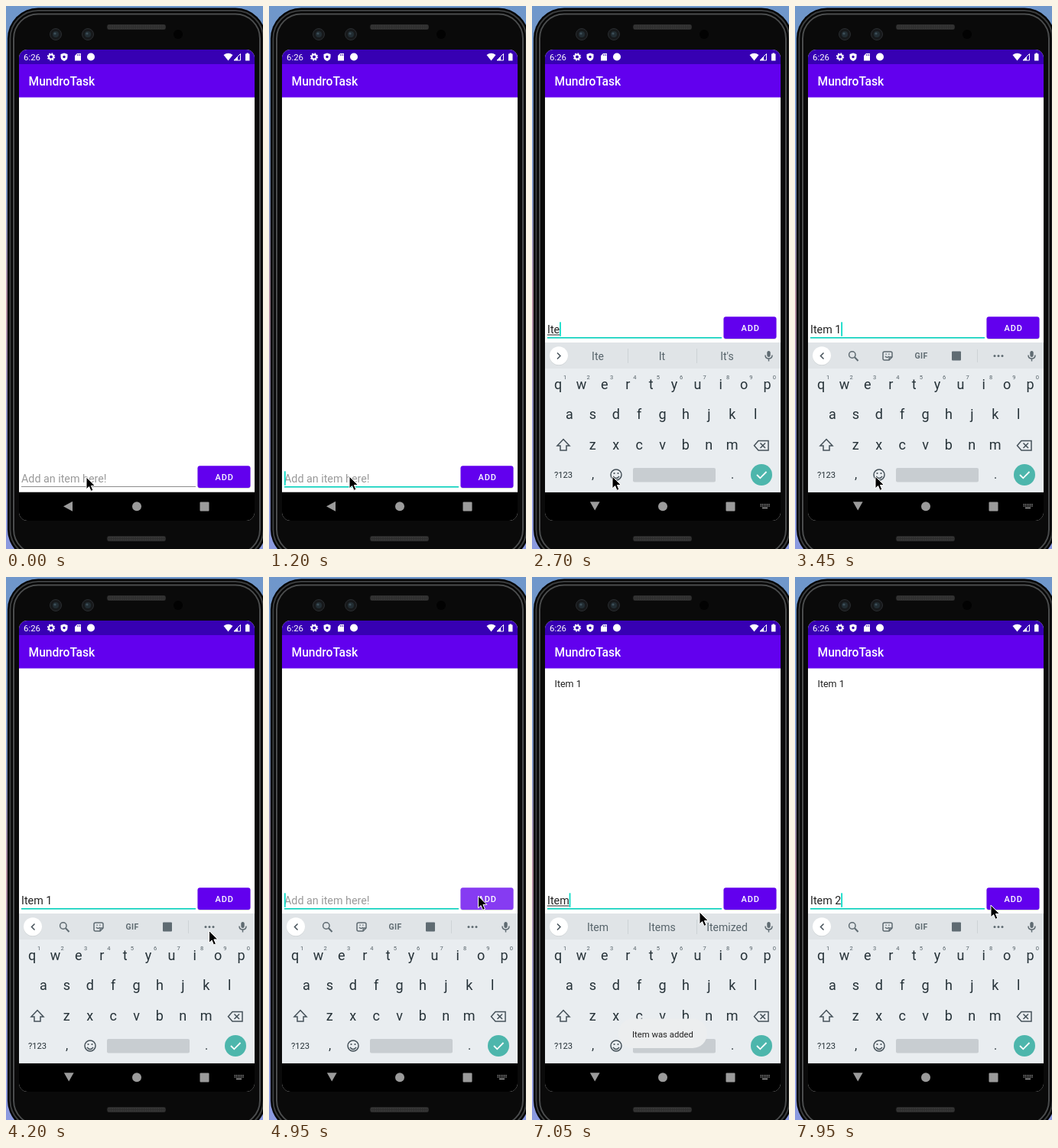
An HTML page for the animation above (8 s loop, 336 by 710 pixels).

```html
<!DOCTYPE html>
<html lang="en">
<head>
<meta charset="utf-8">
<title>Todo list demo</title>
<style>
html, body { margin: 0; width: 100%; height: 100%; overflow: hidden; background: #000; }
svg { display: block; width: 336px; height: 710px; font-family: Roboto, "Noto Sans", sans-serif; }
text { white-space: pre; }
.mid { text-anchor: middle; }
.med { font-weight: 500; }
.bold { font-weight: 700; }
.line { fill: none; stroke: #5f6b72; stroke-width: 1.5; }
.dark { fill: none; stroke: #455159; stroke-width: 1.5; }
</style>
</head>
<body>
<svg id="stage" viewBox="0 0 336 710"></svg>
<script>
const LOOP = 8000, TICK = 150;
const label = (x, y, size, fill, str, cls = '', more = '') =>
  `<text x="${x}" y="${y}" font-size="${size}" fill="${fill}" class="${cls}" ${more}>${str}</text>`;
const box = (x, y, w, h, fill, r = 0, more = '') =>
  `<rect x="${x}" y="${y}" width="${w}" height="${h}" rx="${r}" fill="${fill}" ${more}/>`;
const disc = (x, y, r, fill, more = '') => `<circle cx="${x}" cy="${y}" r="${r}" fill="${fill}" ${more}/>`;
const path = (d, more) => `<path d="${d}" ${more}/>`;
const LINE = 'class="line"', DARK = 'class="dark"';

function phone() {
  // Concentric rounded outlines; the right side runs past the stage edge.
  const shell = (inset, fill, stroke = 'none', w = 0) =>
    box(2 + inset, 2.5 + inset, 338 - 2 * inset, 722 - 2 * inset, fill, 40 - inset, `stroke="${stroke}" stroke-width="${w}"`);
  const camera = x => disc(x, 37, 7.5, '#17191b', 'stroke="#2a2d30"') +
    disc(x, 37, 4, '#222d33') + disc(x - 1, 36, 1.6, '#3d4f59');
  const speaker = y => box(132, y, 77, 7, '#2b2b2b', 3) +
    path(`M134 ${y + 2.2}H207M134 ${y + 4.8}H207`, 'stroke="#484848" stroke-width="1.2" stroke-dasharray="1.2 1.2"');
  return box(0, 0, 336, 710, 'url(#wall)') +
    shell(0, '#050505') + shell(3.5, 'none', '#3a3c3d', 2) + shell(8, '#0a0a0a', '#4a4c4d', 2) +
    camera(65) + camera(107) + disc(225, 37, 6, '#020202') + speaker(24) + speaker(693);
}

function topBars() {
  const gear = disc(59, 66.5, 3, 'none', 'stroke="#fff" stroke-width="2"') +
    disc(59, 66.5, 4.5, 'none', 'stroke="#fff" stroke-width="1.4" stroke-dasharray="1.8 1.73"');
  const shield = path('M76 61.5L80.5 63V66.5Q80.5 70.5 76 72Q71.5 70.5 71.5 66.5V63Z', 'fill="#fff"') +
    disc(76, 66.5, 1.7, '#3700b3');
  const card = path('M93 62H98V71.5H90V65Z', 'fill="#fff"') +
    path('M93.5 63V65M95.2 63V65M96.8 63V65', 'stroke="#3700b3" stroke-width=".7"');
  const status = path('M284.5 64Q290.5 59.5 296.5 64L290.5 71.5Z', 'fill="#fff"') +
    path('M298 71L306.5 62.5V71Z', 'fill="none" stroke="#fff"') + path('M298 71L303 66V71Z', 'fill="#fff"') +
    path('M313 62.5H314.5V61.5H317V62.5H318.5V71.5H313Z', 'fill="#fff"');
  return box(17, 57, 308, 19, '#3700b3') + box(17, 76, 308, 43.5, '#6200ee') +
    label(23, 71, 11.4, '#fff', '6:26') + gear + shield + card +
    disc(111, 66.5, 5, '#fff') + status +
    label(29.5, 104, 15.6, '#fff', 'MundroTask', 'med');
}

function navBar() {
  const grey = '#9b9b9b';
  let dots = '';
  for (let i = 0; i < 12; i++) dots += box(298.5 + (i % 6) * 2.2, 651 + (i / 6 | 0) * 2.2, 1.3, 1.3, grey);
  return box(17, 635.7, 308, 38, '#000') +
    `<path id="back" fill="${grey}"/>` + disc(171, 654.3, 6, grey) + box(253.5, 648.5, 12, 12, grey, 1) +
    `<g id="switcher">${dots}${box(301, 655.6, 7, 1.5, grey)}</g>`;
}

function toolbar() {
  const ink = '#5f6b72';
  return path('M37.5 453.5L33.5 457.5L37.5 461.5', DARK) +
    disc(74.8, 456, 4.2, 'none', LINE) + path('M78 459.3L82.5 464', 'stroke="#5f6b72" stroke-width="2"') +
    path('M117 452H125Q127 452 127 454V459L123 463H117Q115 463 115 461V454Q115 452 117 452ZM127 459H124Q123 459 123 463', LINE) +
    path('M118 458Q120.5 461 123 458M118.5 455.3H119.7M122.3 455.3H123.5', LINE) +
    label(165, 461.2, 10.5, ink, 'GIF', 'mid bold', 'letter-spacing=".4"') +
    box(205, 451.5, 12, 12, ink, 1) + box(238, 449, 1, 17, '#cdd3d6') +
    [261, 266, 271].map(x => disc(x, 457.5, 1.5, ink)).join('');
}

function keyboard() {
  const ink = '#263238';
  let keys = '';
  const row = (str, x0, y) => [...str].forEach((c, i) => {
    keys += label(x0 + i * 30.4, y, 18, ink, c, 'mid');
  });
  row('qwertyuiop', 34, 501);
  row('asdfghjkl', 49, 540);
  row('zxcvbnm', 79.3, 580);
  for (let i = 0; i < 10; i++) keys += label(43.2 + i * 30.4, 488, 7.5, '#546067', (i + 1) % 10, 'mid');
  const mic = box(307.3, 451, 4.4, 8, '#5f6b72', 2.2) + path('M305 456.5Q305 461 309.5 461Q314 461 314 456.5M309.5 461V464.5', LINE);
  const words = path('M33 453.5L37 457.5L33 461.5', DARK) +
    box(125, 448, 1, 19, '#cdd3d6') + box(215, 448, 1, 19, '#cdd3d6') +
    [86, 170, 255].map(x => label(x, 462.5, 14, '#56636a', '', 'mid word')).join('');
  return box(17, 440, 308, 195.7, '#e9edf0') + box(17, 440, 308, 34, '#e0e4e7') +
    disc(35, 458, 12, '#cbd0d3') + disc(35, 457.3, 12, '#fff') +
    `<g id="tools">${toolbar()}</g><g id="words">${words}</g>` + mic + keys +
    path('M41 566.5L49 575H45V581H37V575H33Z', DARK) +
    path('M296 568.5H309V581H296L290.5 574.8ZM298.5 571.5L305 578M305 571.5L298.5 578', DARK) +
    label(41, 617, 11.2, ink, '?123', 'mid') + label(79.5, 618, 16, ink, ',', 'mid') + label(262, 618, 16, ink, '.', 'mid') +
    disc(110, 613, 7, 'none', DARK) + disc(107.5, 611, 1.1, '#455159') + disc(112.5, 611, 1.1, '#455159') +
    path('M106 615Q110 620 114 615', DARK) +
    box(132, 604, 108, 18.5, '#c8cdd1', 2) + disc(300, 613, 14, '#4db6ac') +
    path('M294 613L298.3 617.3L306.5 609', 'fill="none" stroke="#fff" stroke-width="1.8"');
}

const entry = `<g id="entry">` +
  label(20, 623, 14.3, '#999', 'Add an item here!', '', 'id="hint"') +
  label(20, 623, 14.3, '#212121', '', '', 'id="typed"') +
  box(20, 624.5, 0, 1, '#212121', 0, 'id="compose"') +
  box(20, 628, 228, 1, '#8c8c8c', 0, 'id="rule"') +
  box(20, 608.3, 1.7, 18.5, '#03dac5', 0, 'id="caret"') +
  box(250.5, 602, 69, 29, '#000', 3, 'opacity=".15"') +
  box(250.5, 601.2, 69, 28.8, '#6200ee', 3) +
  box(250.5, 601.2, 69, 28.8, '#fff', 3, 'id="press"') +
  label(285.7, 619.8, 11, '#fff', 'ADD', 'mid med', 'letter-spacing=".9"') + `</g>`;

const stage = document.getElementById('stage');
stage.innerHTML = `<defs>
  <linearGradient id="wall" x2="0" y2="1">
    <stop stop-color="#6f97cb"/><stop offset=".35" stop-color="#7d93c0"/>
    <stop offset=".55" stop-color="#b08a9d"/><stop offset=".75" stop-color="#8e92c4"/><stop offset="1" stop-color="#8b9ae0"/>
  </linearGradient>
  <clipPath id="screen">${box(17, 57, 308, 616, '#fff', 11)}</clipPath></defs>` +
  phone() + `<g clip-path="url(#screen)">` + box(17, 57, 308, 616, '#fff') + topBars() +
  label(29.5, 143.5, 12.5, '#212121', 'Item 1', '', 'id="item"') + entry + navBar() +
  `<g id="keyboard">${keyboard()}</g>` +
  `<g id="toast">${box(113, 577.5, 116, 38.5, '#eceeef', 19)}${label(171, 602, 11.3, '#212121', 'Item was added', 'mid')}</g></g>` +
  path('M0 0V15.8L3.6 12.5L6 18.4L8.9 17.2L6.4 11.4H11.4Z',
    'id="pointer" fill="#000" stroke="#fff" stroke-width="1" stroke-linejoin="round"');

const el = {};
stage.querySelectorAll('[id]').forEach(n => el[n.id] = n);
const wordEls = stage.querySelectorAll('.word');

// Each track holds [start time, value...]; a value stays until the next one.
const typing = [[0, ''], [2250, 'I'], [2550, 'It'], [2700, 'Ite'], [2850, 'Item'], [3150, 'Item '],
  [3450, 'Item 1'], [4950, ''], [5850, 'i'], [6450, ''], [6600, 'I'], [6750, 'It'], [6900, 'Ite'],
  [7050, 'Item'], [7350, 'Item '], [7500, 'Item 2']];
const hints = { I: "I I'm I'll", It: "It It's Its", Ite: "Ite It It's", Item: 'Item Items Itemized', i: "i I I'm", next: 'in is for' };
const strip = [[0, ''], [2400, 'I'], [2550, 'It'], [2700, 'Ite'], [2850, 'Item'], [3300, 'next'], [3450, ''],
  [6000, 'i'], [6450, ''], [6600, 'I'], [6750, 'It'], [6900, 'Ite'], [7050, 'Item'], [7350, 'next'], [7650, '']];
const caret = [[0, 0], [1200, 1], [1500, 0], [1800, 1], [4050, 0], [4650, 1], [5550, 0], [5850, 1]];
const slide = [[0, 0, 0], [1500, 25, .35], [1650, 10.5, .8], [1800, 0, 1]];
const press = [[0, 0], [4800, .13], [4950, .23], [5100, .1], [5250, 0]];
const toast = [[0, 0], [5100, .5], [5250, 1], [7200, .5], [7350, 0]];
const pointer = [[0, 105, 616], [150, 102, 616], [450, 101, 616], [1050, 105, 615], [3750, 118, 608], [3900, 178, 560],
  [4050, 244, 492], [4200, 265.5, 462.5], [4350, 270, 441], [4500, 273, 425], [4650, 273.5, 417],
  [5400, 240, 430], [5550, 219, 438], [7950, 256, 429]];

const at = (track, t) => track.findLast(k => k[0] <= t).slice(1);
const set = (node, name, value) => node.setAttribute(name, value);
const show = (node, alpha) => set(node, 'opacity', +alpha);

function draw(time) {
  const t = Math.floor(time / TICK) * TICK;
  const [text] = at(typing, t), [key] = at(strip, t), [drop, alpha] = at(slide, t);
  const open = t >= 1500, focus = t >= 1050;

  set(el.entry, 'transform', `translate(0 ${open ? -195 : 0})`);
  el.typed.textContent = text;
  const width = text ? el.typed.getComputedTextLength() : 0;
  show(el.hint, !text);
  set(el.compose, 'width', /[a-z]$/i.test(text) ? width : 0);
  set(el.rule, 'fill', focus ? '#03cfbb' : '#8c8c8c');
  set(el.rule, 'height', focus ? 1.6 : 1);
  set(el.caret, 'x', 20 + width);
  show(el.caret, at(caret, t)[0]);
  show(el.press, at(press, t)[0]);
  show(el.item, t >= 5100);
  show(el.toast, at(toast, t)[0]);

  set(el.keyboard, 'transform', `translate(0 ${drop})`);
  show(el.keyboard, alpha);
  show(el.tools, !key);
  show(el.words, !!key);
  const list = key ? hints[key].split(' ') : [];
  wordEls.forEach((n, i) => n.textContent = list[i] || '');

  set(el.back, 'd', open ? 'M75.8 648.2H88.6L82.2 659.5Z' : 'M87 647.7V660.7L75 654.2Z');
  show(el.switcher, open);
  set(el.pointer, 'transform', `translate(${at(pointer, t).join(' ')})`);
}

const start = performance.now();
function loop() {
  draw((performance.now() - start) % LOOP);
  requestAnimationFrame(loop);
}
loop();
</script>
</body>
</html>
```
